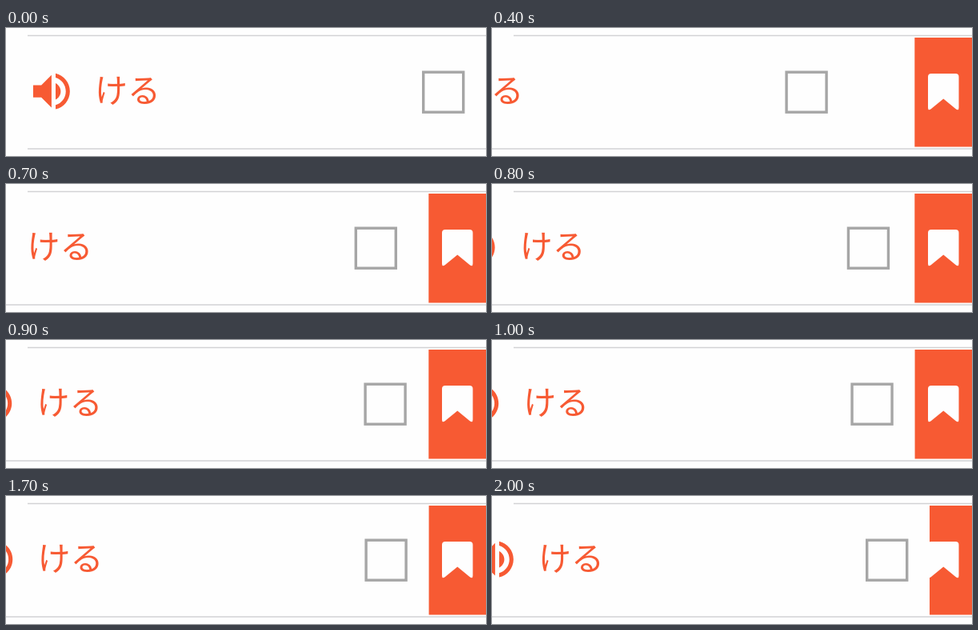
These frames come from a looping animation (600 px wide and 160 px high, 2100 ms). An HTML page:

```html
<!DOCTYPE html>
<html lang="ja">
<head>
<meta charset="utf-8">
<style>
html, body { margin: 0; width: 100%; height: 100%; overflow: hidden; background: #fefefe; }
svg { display: block; width: 600px; height: 160px; }
text { font: 41px "Noto Sans CJK JP", "Noto Sans CJK", sans-serif; }
</style>
</head>
<body>
<svg viewBox="0 0 600 160">
  <g id="action">
    <rect x="528.3" y="12" width="72" height="136.5" fill="#f75a33"/>
    <path fill="#fefefe" d="M549 57H579.500Q583.500 57 583.500 61V99.500Q583.500 104 579.500 101L564.300 88.500 549 101Q545 104 545 99.500V61Q545 57 549 57Z"/>
  </g>
  <g id="row" fill="#f75a33">
    <rect y="11" width="600" height="139" fill="#fefefe"/>
    <path transform="translate(26.300 48.600) scale(2.550)" d="M3 9v6h4l5 5V4L7 9H3zm13.500 3c0-1.770-1.020-3.290-2.500-4.030v8.050c1.480-.730 2.500-2.250 2.500-4.020zM14 3.230v2.060c2.890.860 5 3.540 5 6.710s-2.110 5.850-5 6.710v2.060c4.010-.910 7-4.490 7-8.770s-2.990-7.860-7-8.770z"/>
    <text x="111" y="93">ける</text>
    <rect x="521.700" y="55.200" width="50" height="50" fill="none" stroke="#a6a6a6" stroke-width="3.400"/>
  </g>
  <g stroke="#d2d2d4" stroke-width="1.500">
    <path d="M27 9.500H600"/>
    <path id="base"/>
  </g>
</svg>
<script>
const LOOP = 2100, STEP = 100, OPEN = 400, CLOSE = 2000;
const REST = -71.6, OVERSHOOT = -82, SETTLE = 650;
const row = document.getElementById("row");
const base = document.getElementById("base");

// Overshooting swipe that eases back to the open position
function offset(t) {
  if (t < OPEN) return 0;
  if (t >= CLOSE) return -53;
  const left = Math.max(0, 1 - (t - OPEN) / SETTLE);
  return REST + OVERSHOOT * left ** 3;
}

const start = performance.now();
function draw(now) {
  const time = Math.max(0, now - start) % LOOP;
  const t = Math.floor(time / STEP) * STEP;
  row.setAttribute("transform", `translate(${offset(t)} 0)`);
  base.setAttribute("d", `M${t < OPEN ? 27 : 0} 151H600`);
  requestAnimationFrame(draw);
}
draw(start);
</script>
</body>
</html>
```
